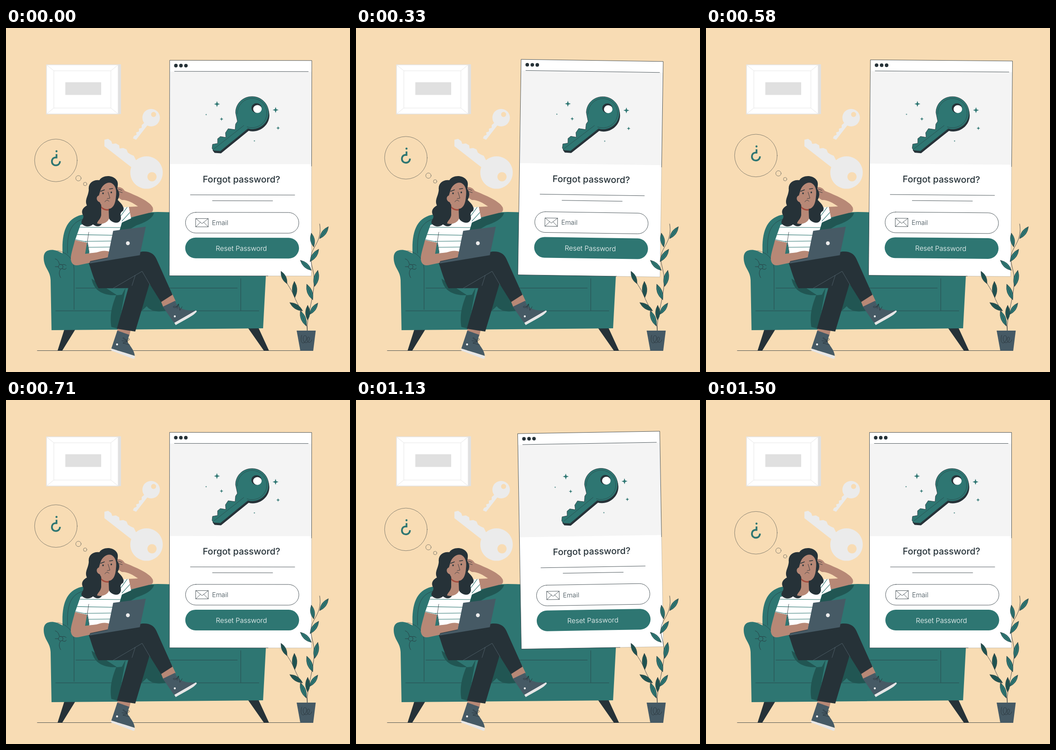
Recreate the animation shown at these times as an HTML page. Size 748 by 748 pixels, loop 1540 ms.

```html
<!DOCTYPE html>
<html lang="en">
<head>
<meta charset="utf-8">
<title>Forgot password</title>
<style>
html, body { margin: 0; width: 100%; height: 100%; overflow: hidden; background: #f8dcb4; }
svg { display: block; width: 100vw; height: 100vh; }
text { font-family: Inter, "Open Sans", sans-serif; }
.teal { fill: #2e7672; }
.deep { fill: #215653; }
.dark { fill: #263238; }
.slate { fill: #465a65; }
.skin { fill: #b78876; }
.pale { fill: #ebebeb; }
.ln { fill: none; stroke: #263238; stroke-width: .8; stroke-linecap: round; stroke-linejoin: round; }
.fine { stroke-width: .55; }
</style>
</head>
<body>
<svg viewBox="0 0 748 748">
  <defs>
    <clipPath id="shirt"><path d="M162 428C185 423 236 412 248 391L267 389 272 414 252 423 247 440 226 488 181 490 177 467 150 462Z"/></clipPath>
    <path id="bit" d="M503 203 499 209 498 221 483 219 477 228 478 238 466 236 460 241 460 251 449 253 448 262 452 267 466 268 526 219C547 225 571 209 571 185 571 165 555 149 535 149 514 149 499 165 499 184Z"/>
  </defs>

  <!-- wall -->
  <path fill="#e0e0e0" d="M243 79h7v108h-7z"/>
  <rect x="88" y="80" width="156" height="107" fill="#fff" stroke="#e3e3e3" stroke-width="1.500"/>
  <path fill="none" stroke="#e6e6e6" d="M104 93H228V174H104ZM88 80l16 13M244 80l-16 13M88 187l16-13M244 187l-16-13"/>
  <path fill="#e0e0e0" d="M129 118h78v27.500h-78z"/>
  <g class="pale" fill-rule="evenodd">
    <path d="M308 211 283 243 276 240 278 235 284 232 283 227 289 225 289 219 295 217 295 211 301 206Z"/>
    <path d="M315.500 176a19 19 0 1 0 .1 0ZM321 182.500a5.500 5.500 0 1 1-.1 0Z"/>
    <path d="M214 243 222 241 229 246 231 252 239 251 246 255 247 262 255 261 262 264 265 271 271 275 278 278 284 290 273 303 214 257Z"/>
    <path d="M305.500 279a35.300 35.300 0 1 0 .1 0ZM317.500 313.500a10 10 0 1 1-.1 0Z"/>
  </g>

  <!-- sofa -->
  <path class="ln" d="M68 701.500H666"/>
  <path class="dark" d="M127 655h24L122 702h-10ZM526 652h23L572 702h-11Z"/>
  <path class="teal" d="M123 490C121 445 130 410 172 405L330 400 520 404C556 410 565 440 565 500L565 540 559 653 99 657 97 548C96 526 82 522 82 499 82 483 96 480 110 484Z"/>
  <path class="ln" stroke-opacity=".75" d="M134 490C132 447 139 419 176 414M112 484C134 488 148 504 148 526V612M152 565.500H503M108 615H550M510.500 545V614"/>
  <path class="ln" d="M119 514a5 5 0 1 1-.1 0M116 514C115 507 111 503 107 502M122 515C126 513 130 515 131 517M118 525C115 531 115 537 119 543M113 519H107M122 523C127 526 130 525 131 522"/>
  <path class="deep" d="M247 440 253 422 300 402 322 402C318 416 299 424 284 429L270 437ZM186 545C192 578 222 584 252 580L260 565 244 654 229 650C225 625 230 605 240 580ZM311 553 338 594 347 615C326 619 313 614 306 605L294 616Z"/>

  <!-- ankles and shoes -->
  <path class="skin" d="M244 651 271 657 268 670 241 662ZM336 592 361 577 369 594 342 607Z"/>
  <path class="slate" d="M242 658 268 667 264 682C269 691 279 700 280 713L229 697ZM341 606 368 593C371 606 381 615 413 615L366 642Z"/>
  <path fill="#e6e6e6" d="M229 697 280 713C281 718 279 720 276 719L228 701ZM366 641 413 614 415 616C409 625 395 631 369 646Z"/>
  <g fill="#f1f1f1"><circle cx="241.500" cy="688" r="2.200"/><circle cx="367" cy="627" r="2.200"/></g>
  <path class="ln" d="M252 680 265 682 254 685 269 689M262 680C254 668 250 675 261 679 270 671 272 680 262 680M372 610 375 600 378 614 383 606M371 606C360 602 362 611 371 607 374 596 380 600 371 606"/>

  <!-- trousers -->
  <path class="dark" d="M180 511 258 493 297 486C313 485 322 491 327 502L362 580 337 596 312 556 281 660 241 654 266 565 201 566C191 548 187 531 180 511Z"/>
  <path class="ln" style="stroke:#566872" d="M233 566 296 529 313 558M281 538 274 560"/>

  <!-- raised arm, shirt, lower arm -->
  <path class="skin" d="M239 347C245 344 254 347 258 354 282 364 312 376 319 390 321 397 319 401 311 402L271 412 266 389 287 388C276 380 263 373 252 374L241 367Z"/>
  <path class="ln" d="M244 350 252 353M246 356 253 358"/>
  <g clip-path="url(#shirt)">
    <path fill="#fff" d="M145 385h130v110H145z"/>
    <path fill="none" stroke="#2e7672" stroke-width="1.200" d="M150 433 250 434M145 449 250 451M145 459 175 465M170 464 245 463M170 477 245 476M245 401 256 391M247 412 264 389M252 420 274 396"/>
  </g>
  <path class="ln" d="M180 444 177 464 181 488"/>
  <path class="skin" d="M150 461C146 478 140 494 141 504 143 515 150 518 161 515L222 502 228 488C217 482 207 485 197 488L172 491 176 467Z"/>
  <path class="dark" d="M181 513 183 507 221 499 292 490 290 495Z"/>
  <path class="slate" d="M233 441 304 432 291 494 182 512 183 508 221 500Z"/>
  <circle class="pale" cx="265" cy="468" r="4.200"/>

  <!-- head -->
  <path class="dark" d="M180 352C178 337 190 329 203 331 210 320 230 319 239 329 245 335 243 342 242 350 249 359 246 367 243 374 249 380 258 388 255 397 246 403 250 406 250 414 248 425 238 425 231 421 222 416 222 408 223 400L207 399C213 412 211 424 207 428 202 433 196 432 189 427 183 433 170 434 164 424 163 418 170 414 168 408 162 398 167 391 176 386 170 374 179 366 180 352Z"/>
  <path class="skin" d="M207 383V407C205 417 199 419 198 425 211 428 220 423 224 415L223 389Z"/>
  <path fill="#a34c3e" d="M207 387C212 394 220 395 224 393L223 397C215 397 210 395 207 391Z"/>
  <path class="skin" d="M205 354C209 341 220 334 229 337 239 342 241 354 239 367 238 381 234 391 225 393 214 393 207 387 204 379 196 377 195 366 202 364Z"/>
  <path class="ln" d="M222 357 226 370 220 371M215 378C218 373 222 374 224 377"/>
  <path class="ln" style="stroke-width:1.600" d="M206 355 214 352M225 350 232 349"/>
  <g class="dark"><ellipse cx="211" cy="359.500" rx="1.500" ry="2"/><ellipse cx="229" cy="357.500" rx="1.500" ry="2"/></g>

  <!-- thought -->
  <g id="thought">
    <g class="ln fine"><circle cx="108.500" cy="288.700" r="46.300"/><circle cx="157.500" cy="327.500" r="5.800"/><circle cx="172" cy="340" r="3.700"/></g>
    <circle class="teal" cx="109.800" cy="268.800" r="2.200"/>
    <path fill="none" stroke="#2e7672" stroke-width="3.800" d="M109.800 275V282.500H107C102 283 99.800 287 99.800 291 99.800 296 103.500 299.500 108.500 299.500 113.500 299.500 117 296 117.500 290.500"/>
  </g>

  <!-- window -->
  <g id="card">
    <path fill="#fff" d="M355.500 70.500h309v468.500h-309z"/>
    <path fill="#f4f4f4" d="M356.500 95h307.500v201h-307.500z"/>
    <path class="ln" d="M664.500 300V70.500H355.500V539H570"/>
    <path class="ln" stroke-opacity=".3" d="M570 539H664.500V300"/>
    <path class="ln" d="M366 94.500H657M401 363H628M449 375.700H580"/>
    <g class="dark"><circle cx="369" cy="82" r="3.900"/><circle cx="380" cy="82" r="3.900"/><circle cx="390.800" cy="82" r="3.900"/></g>
    <use href="#bit" class="dark" x="1.500" y="4.500"/>
    <use href="#bit" class="teal" stroke="#263238" stroke-width=".8"/>
    <path class="ln fine" d="M452 263 517 212M524 215A32 32 0 1 0 503 187"/>
    <ellipse class="dark" cx="544.500" cy="174" rx="11" ry="10.500"/>
    <ellipse fill="#fff" cx="546.500" cy="176" rx="9.300" ry="8.600"/>
    <g id="sparks" class="teal"></g>
    <text class="dark" x="512" y="336" text-anchor="middle" font-size="19.700" font-weight="500">Forgot password?</text>
    <rect class="ln" x="390.500" y="401" width="246.500" height="45" rx="22.500"/>
    <path class="ln" d="M413 414.500H440V432.500H413ZL426.500 425.500 440 414.500M413 432.500 423 422.500M440 432.500 430 422.500"/>
    <text x="448" y="428.500" font-size="14.300" font-weight="300" fill="#37474f">Email</text>
    <rect class="teal" x="390" y="456" width="247.500" height="45" rx="22.500"/>
    <text x="512" y="484.500" text-anchor="middle" font-size="15" font-weight="300" fill="#fff">Reset Password</text>
  </g>

  <!-- plant -->
  <path class="ln" d="M655 658C653 625 672 580 670 545 669 523 660 510 664 492 668 475 688 460 682 426M655 658C655 632 635 605 626 582 620 566 606 552 600 532"/>
  <g id="leaves"></g>
  <path class="slate" d="M632 658H673.500L668 702H640Z"/>
  <path class="ln" d="M643 668C638 684 646 690 652 680 658 668 646 664 646 676 648 690 660 684 660 674 657 668 653 676 656 682 660 686 664 682 665 678"/>
</svg>
<script>
const LOOP = 1540, STEPS = 37;
const $ = id => document.getElementById(id);

const spark = ([x, y, r]) => {
  const k = r * .25;
  return `<path d="M${x} ${y - r}l${k} ${r - k} ${r - k} ${k} ${k - r} ${k} ${-k} ${r - k} ${-k} ${k - r} ${k - r} ${-k} ${r - k} ${-k}z"/>`;
};
$('sparks').innerHTML = [[458.5, 165.5, 6.5], [586, 178, 6.5], [468.5, 198, 4],
  [591.5, 217.3, 4], [435, 188.5, 2], [540, 245.5, 2]].map(spark).join('');

// A leaf runs from its base (x, y) to its tip (u, v).
const leaf = ([x, y, u, v, tone]) => {
  const px = (y - v) * .3, py = (u - x) * .3;
  const mx = x * .5 + u * .5, my = y * .5 + v * .5;
  return `<path class="${tone || 'teal'}" stroke="#263238" stroke-width=".6" d="M${x} ${y}Q${mx + px} ${my + py} ${u} ${v}Q${mx - px} ${my - py} ${x} ${y}"/>` +
    `<path class="ln fine" d="M${x} ${y}L${u} ${v}"/>`;
};
$('leaves').innerHTML = [
  [682, 458, 701, 432], [669, 476, 664, 446], [661, 508, 680, 481],
  [664, 527, 640, 505], [671, 562, 678, 527], [667, 591, 654, 557],
  [660, 623, 678, 598], [653, 648, 640, 615], [656, 635, 656, 603, 'deep'],
  [611, 556, 598, 529, 'deep'], [628, 586, 627, 551, 'deep'], [645, 615, 617, 597, 'deep']
].map(leaf).join('');

function draw(ms) {
  const p = (Math.floor(ms % LOOP / LOOP * STEPS) + 1) / STEPS % 1;
  const lift = 15 * (1 - Math.abs(2 * p - 1));
  const tilt = p < .25 ? 4 * p : p < .75 ? 2 - 4 * p : 4 * p - 4;
  $('thought').setAttribute('transform', `translate(0 ${-lift})`);
  $('card').setAttribute('transform', `rotate(${tilt} 510 304.700)`);
}

const start = performance.now();
function tick() {
  draw(performance.now() - start);
  requestAnimationFrame(tick);
}
tick();
</script>
</body>
</html>
```
